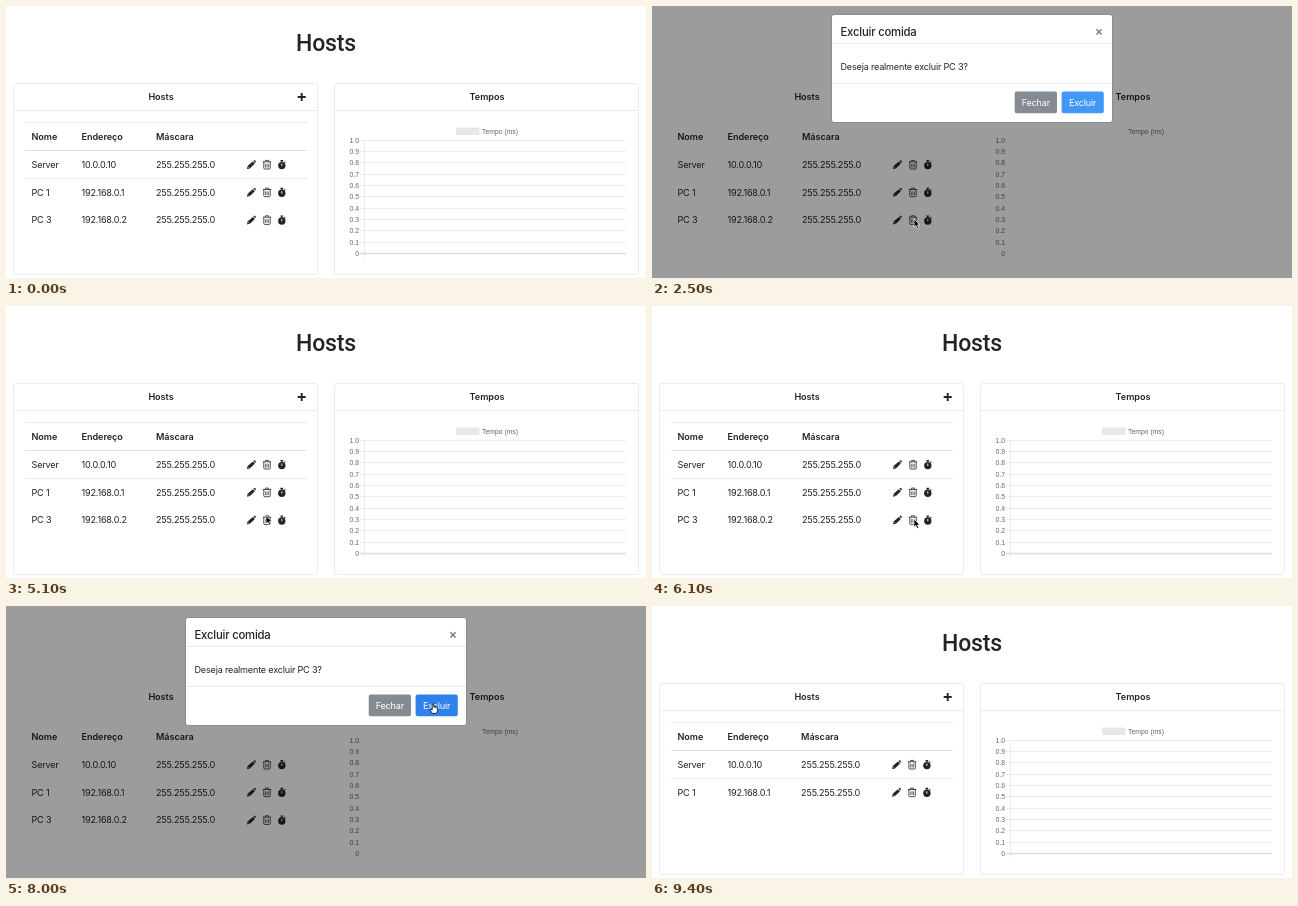
An HTML page for the animation above (9.6 s loop, 640 by 272 pixels).

```html
<!DOCTYPE html>
<html lang="pt">
<head>
<meta charset="utf-8">
<title>Hosts</title>
<style>
  html, body { margin: 0; width: 100%; height: 100%; overflow: hidden; background: #fff; }
  svg { display: block; width: 100vw; height: 100vh; }
  text { font: 9.1px Inter, Roboto, sans-serif; letter-spacing: -.2px; fill: #212529; }
  .b { font-weight: 600; letter-spacing: -.05px; }
  .mid { text-anchor: middle; }
  .h1 { font: 500 23px Roboto, sans-serif; letter-spacing: -.2px; }
  .h5 { font: 500 11.3px Inter, Roboto, sans-serif; letter-spacing: -.2px; }
  .btn { fill: #fff; }
  .chart text { font: 6.84px "Liberation Sans", Arial, sans-serif; letter-spacing: 0; fill: #666; }
  .lines path, .lines rect { fill: none; stroke: #ececec; }
</style>
</head>
<body>
<svg viewBox="0 0 640 272" preserveAspectRatio="none">
  <defs>
    <g id="pencil" fill="#212529">
      <path d="M-4.3 4.3 -3.7 1.3 1.5-3.2 3.6-1.1-1.4 3.7Z"/>
      <path d="M2.1-3.7 2.9-4.4Q3.4-4.7 3.9-4.2L4.4-3.6Q4.8-3.1 4.3-2.5L3.9-1.8Z"/>
      <path d="M-3.3 2 -2.1 3.2" stroke="#fff" stroke-width=".6"/>
    </g>
    <g id="trash" fill="none" stroke="#343a40" stroke-width=".9">
      <path d="M-4.2-2.9H4.2M-1.6-3.1V-4.3H1.6V-3.1M-3.2-2.8V3.4Q-3.2 4.3-2.3 4.3H2.3Q3.2 4.3 3.2 3.4V-2.8"/>
      <path d="M-1.4-1V2.8M0-1V2.8M1.4-1V2.8" stroke-width=".7"/>
    </g>
    <g id="watch" fill="#212529">
      <circle cy=".9" r="3.7"/>
      <path d="M-1.4-4.6H1.4V-3.5H.6V-2H-.6V-3.5H-1.4ZM2.1-2.4 3.1-3.4 3.9-2.6 2.9-1.6Z"/>
      <path d="M0-1.2V1.2" stroke="#fff" stroke-width=".9"/>
    </g>
    <g id="tools">
      <use href="#pencil" x="245.3"/><use href="#trash" x="261"/><use href="#watch" x="275.8"/>
    </g>
  </defs>

  <rect width="640" height="272" fill="#fff"/>
  <g class="lines" id="lines">
    <rect x="7.5" y="77.5" width="304" height="191" rx="2"/>
    <rect x="328.5" y="77.5" width="304" height="191" rx="2"/>
    <path d="M8 104.5H311M329 104.5H632M19 116.5H301M19 172.5H301"/>
    <path d="M19 144.5H301" style="stroke:#dfe2e5"/>
    <rect x="450.5" y="122" width="22.5" height="6.5" style="fill:#e8e8e8;stroke:#e2e2e2;stroke-width:.6"/>
  </g>

  <text class="h1 mid" x="320" y="44.5">Hosts</text>
  <text class="b mid" x="155" y="94.2">Hosts</text>
  <text class="b mid" x="481" y="94.2">Tempos</text>
  <path d="M291.7 91H299.7M295.7 87V95" stroke="#212529" stroke-width="1.9"/>
  <text class="b" x="25.5" y="134">Nome</text>
  <text class="b" x="75.5" y="134">Endereço</text>
  <g id="mask"><text class="b" x="150" y="134">Máscara</text></g>
  <g id="rows"></g>
  <g class="chart" id="chart"><text x="476" y="127.6">Tempo (ms)</text></g>

  <rect id="shade" width="640" height="272" fill="#000"/>

  <g id="modal">
    <rect x="179.5" y="11.5" width="281" height="108" rx="2.5" fill="#000" opacity=".2"/>
    <rect x="180" y="12" width="280" height="107" rx="2" fill="#fff"/>
    <path d="M180 40.5H460M180 80.5H460" stroke="#e9ecef"/>
    <text class="h5" x="188.5" y="33.3">Excluir comida</text>
    <path d="M444.4 26.3 449.6 31.5M449.6 26.3 444.4 31.5" stroke="#7f7f7f" stroke-width="1.5"/>
    <text x="188.5" y="66.6">Deseja realmente excluir PC 3?</text>
    <rect id="close" x="362.7" y="88.5" width="42.3" height="21.7" rx="2"/>
    <rect id="remove" x="409.6" y="88.5" width="42.2" height="21.7" rx="2"/>
    <text class="btn mid" x="383.8" y="102.7">Fechar</text>
    <text class="btn mid" x="430.6" y="102.7">Excluir</text>
  </g>

  <g id="cursor">
    <path id="arrow" d="M0 0V8.2L1.9 6.5 3.2 9.5 4.7 8.8 3.4 5.9H5.9Z" fill="#000" stroke="#fff" stroke-width=".7"/>
    <path id="hand" d="M-.8.4Q0-.5.8.4V3.3Q1.6 2.7 2.2 3.5 3 3 3.5 3.9 4.6 3.6 4.6 4.8V6.5L3.6 9.4H-.6L-3 5.9Q-2.9 4.6-1.7 5.2L-.8 6Z" fill="#fff" stroke="#000" stroke-width=".8"/>
  </g>
</svg>

<script>
const LOOP = 9600, TICK = 100, DIM = 0.39, SLIDE = 27;
const DELETED = 8150;

// Opening and closing times of the dialog
const SHOWS = [
  { open: 2150, close: 4400 },
  { open: 6150, close: 8010 }
];

// Pointer: time, x, y
const PATH = [
  [0, 345, 275], [100, 341, 264], [500, 300, 234], [800, 268, 214],
  [900, 268, 214], [1000, 252, 203], [1100, 252, 203], [1200, 266, 214],
  [1500, 266, 214], [1600, 262, 213], [2800, 262, 213], [3300, 330, 158],
  [3900, 389, 104], [4400, 389, 104], [4900, 302, 164], [5100, 260, 209.5],
  [5400, 256, 212], [5700, 264, 215], [5800, 264, 215], [5900, 262, 213],
  [6400, 262, 213], [6800, 393, 133], [7400, 427, 98], [8900, 427, 98],
  [9300, 342, 262], [9400, 342, 275], [9600, 345, 275]
];

const HOSTS = [
  ['Server', '10.0.0.10'],
  ['PC 1', '192.168.0.1'],
  ['PC 3', '192.168.0.2']
];

const $ = id => document.getElementById(id);
const clamp = v => Math.max(0, Math.min(1, v));
const span = (t, from, length) => clamp((t - from) / length);
const easeOut = p => 1 - (1 - p) ** 2;
const set = (id, attrs) => {
  for (const key in attrs) $(id).setAttribute(key, attrs[key]);
};
const show = (id, on) => set(id, { visibility: on ? 'visible' : 'hidden' });

function build() {
  $('rows').innerHTML = HOSTS.map(([name, address], i) => {
    const y = 158.7 + i * 27.7;
    return `<g><text x="25.5" y="${y + 3.2}">${name}</text>
      <text x="75.5" y="${y + 3.2}">${address}</text>
      <g class="shift"><text x="150" y="${y + 3.2}">255.255.255.0</text>
      <use href="#tools" y="${y}"/></g></g>`;
  }).join('');

  let labels = '', grid = '';
  for (let i = 0; i <= 10; i++) {
    const y = 134.3 + i * 11.33;
    const label = i === 10 ? '0' : (1 - i / 10).toFixed(1);
    labels += `<text x="353" y="${y + 2.4}" text-anchor="end">${label}</text>`;
    if (i < 10) grid += `M354 ${Math.floor(y) + 0.5}H620`;
  }
  $('chart').innerHTML += labels;
  $('lines').innerHTML += `<path d="${grid}M358.5 134V252"/>
    <path d="M354 247.5H620" style="stroke:#dcdcdc;stroke-width:1.5"/>`;
}

function pointer(t) {
  const i = PATH.findIndex(k => k[0] > t);
  const [t0, x0, y0] = PATH[i - 1], [t1, x1, y1] = PATH[i];
  const p = (t - t0) / (t1 - t0);
  return [x0 + (x1 - x0) * p, y0 + (y1 - y0) * p];
}

// The shade comes first and leaves last; the dialog slides in between.
function dialog(t) {
  const { open, close } = SHOWS.find(s => t < s.close + 400) || SHOWS[1];
  const closing = t >= close;
  return {
    shade: span(t, open, 150) - span(t, close + 215, 150),
    alpha: span(t, open + 150, 150) - span(t, close, 150),
    lift: closing ? easeOut(span(t, close, 300)) : 1 - easeOut(span(t, open + 150, 300))
  };
}

function draw(t) {
  const { shade, alpha, lift } = dialog(t);
  const [x, y] = pointer(t);
  const over = left => alpha === 1 && x > left && x < left + 42 && y > 88 && y < 110;
  const onClose = over(363), onRemove = over(410);

  set('shade', { opacity: shade * DIM });
  show('lines', shade === 0);
  show('modal', alpha > 0);
  set('modal', { opacity: alpha, transform: `translate(0 ${-lift * SLIDE})` });
  set('close', { fill: onClose ? '#6f767d' : '#848b92' });
  set('remove', { fill: onRemove ? '#2f82ea' : '#4297f9' });

  set('cursor', { transform: `translate(${x} ${y})` });
  show('arrow', !onClose && !onRemove);
  show('hand', onClose || onRemove);

  const gone = t >= DELETED;
  $('rows').lastElementChild.setAttribute('visibility', gone ? 'hidden' : 'visible');
  for (const g of [$('mask'), ...document.querySelectorAll('.shift')])
    g.setAttribute('transform', `translate(${gone ? -0.9 : 0} 0)`);
}

build();
const start = performance.now();
function frame() {
  const t = (performance.now() - start) % LOOP;
  draw(Math.floor(t / TICK) * TICK);
  requestAnimationFrame(frame);
}
frame();
</script>
</body>
</html>
```
